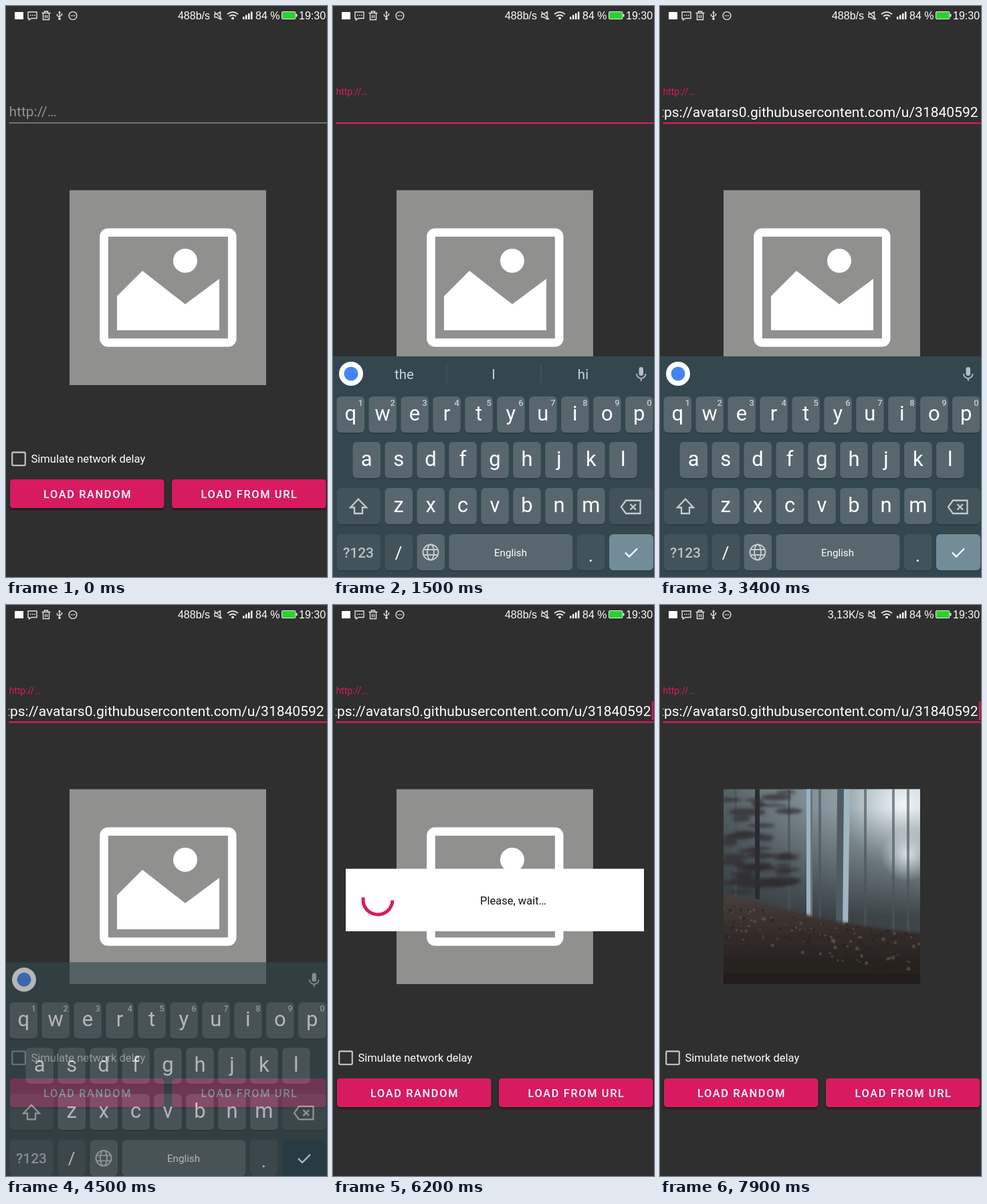
Write an HTML page that moves like this. It is 480 px wide and 854 px high and loops after 8 s.

```html
<!DOCTYPE html>
<html lang="en">
<head>
<meta charset="utf-8">
<title>Image loader</title>
<style>
  html, body { margin: 0; width: 100%; height: 100%; overflow: hidden; background: #2e2f2e; }
  svg { display: block; width: 100vw; height: 100vh; }
  text { font-family: Roboto, sans-serif; fill: #fff; white-space: pre; }
  .status text { font: 16px "Liberation Sans", Arial, sans-serif; }
  .line { fill: none; stroke: #e4e4e4; stroke-width: 1.4; }
  .btn { font-size: 16.35px; font-weight: 500; letter-spacing: 1.65px; text-anchor: middle; }
  .mid { text-anchor: middle; }
  .key { font-size: 31px; text-anchor: middle; }
  .digit { font-size: 13px; font-weight: 500; text-anchor: middle; fill: #c4cdd1; }
  .icon { fill: none; stroke: #c3ccd0; stroke-width: 2.3; }
  .word { font-size: 20.5px; text-anchor: middle; fill: #cbd3d6; }
</style>
</head>
<body>
<svg viewBox="0 0 480 854" preserveAspectRatio="none">
  <defs>
    <clipPath id="field"><rect x="4" y="140" width="476" height="40"/></clipPath>
    <clipPath id="photoBox"><rect x="95" y="275.5" width="294" height="291.5"/></clipPath>
    <clipPath id="leftBtn"><rect x="6" y="708" width="230.5" height="43" rx="4.5"/></clipPath>
    <clipPath id="rightBtn"><rect x="248" y="708" width="230.5" height="43" rx="4.5"/></clipPath>
    <linearGradient id="mist" x1="0" y1="0.3" x2="1" y2="0">
      <stop offset="0" stop-color="#4b5559"/><stop offset="0.45" stop-color="#7f8e94"/><stop offset="1" stop-color="#b4c3cb"/>
    </linearGradient>
    <linearGradient id="haze" x1="0" y1="0" x2="0" y2="1">
      <stop offset="0.1" stop-color="#3a4448" stop-opacity="0"/><stop offset="0.65" stop-color="#333a3d" stop-opacity="0.9"/>
    </linearGradient>
    <linearGradient id="soil" x1="0" y1="0" x2="0" y2="1">
      <stop offset="0" stop-color="#4a403d"/><stop offset="0.45" stop-color="#332b28"/><stop offset="1" stop-color="#1d1a18"/>
    </linearGradient>
    <radialGradient id="sun"><stop offset="0" stop-color="#f1f6f8"/><stop offset="1" stop-color="#dfe9ee" stop-opacity="0"/></radialGradient>
    <filter id="soft"><feGaussianBlur stdDeviation="2"/></filter>
    <filter id="shade" x="-5%" y="-20%" width="110%" height="150%"><feGaussianBlur stdDeviation="1.5"/></filter>
  </defs>
  <rect width="480" height="854" fill="#2e2f2e"/>

  <g class="status">
    <rect x="13" y="9" width="13" height="11" fill="#fff"/>
    <path class="line" d="M33 9H46V18.5H38L34.5 21V18.5H33Z M36 13.8h1.6m1.4 0h1.6m1.4 0h1.6"/>
    <path class="line" d="M53.5 10.5H66.5M57.5 10.5V8H62.5V10.5M55.5 11V20.5H64.5V11M58.6 13.5v4.5M61.4 13.5v4.5"/>
    <path class="line" d="M80 9V19M76.5 12V14.5L80 17M83.5 11V13.5L80 16"/>
    <path d="M78 10.5L80 7L82 10.5Z" fill="#e4e4e4"/>
    <circle cx="80" cy="19.3" r="1.8" fill="#e4e4e4"/>
    <circle class="line" cx="100" cy="14.5" r="5.9"/>
    <path class="line" d="M96.7 14.5h1.6m.9 0h1.6m.9 0h1.6"/>
    <text id="speed" x="305" y="20" text-anchor="end"></text>
    <path class="line" d="M312 12H315L320.5 8.8V19.8L315 16.8H312ZM311.5 8.5L323 20"/>
    <path class="line" style="stroke-width:2" d="M331 12.3Q339 5.8 347 12.3M334 15.5Q339 11.5 344 15.5"/>
    <circle cx="339" cy="18.3" r="1.9" fill="#fff"/>
    <path d="M354 20v-4h2.5v4zM358 20v-6.500h2.500v6.500zM362 20v-9h2.500v9zM366 20V8.500h2.500V20z" fill="#fff"/>
    <text x="373" y="20">84 %</text>
    <rect x="412.500" y="8.500" width="20.500" height="11" rx="1.500" fill="#2bd12f" stroke="#e8e8e8"/>
    <rect x="433.500" y="12" width="2" height="4" fill="#e8e8e8"/>
    <text x="438" y="20">19:30</text>
  </g>

  <text id="label" x="4.500">http://…</text>
  <text id="url" x="475.500" y="166" font-size="21" text-anchor="end" clip-path="url(#field)">https://avatars0.githubusercontent.com/u/31840592</text>
  <rect id="rule" x="4.500" width="476"/>
  <rect id="caret" y="144" width="2.500" height="28" fill="#d81b60"/>

  <g id="placeholder">
    <rect x="95" y="275.500" width="294" height="291.500" fill="#90918f"/>
    <rect x="146.500" y="338.700" width="191.700" height="164.800" rx="6" fill="none" stroke="#fff" stroke-width="12.600"/>
    <circle cx="268" cy="381" r="18" fill="#fff"/>
    <path d="M166 434L204 396L268 446L319 408V485H166Z" fill="#fff"/>
  </g>
  <g id="avatar"></g>
  <g id="photo" clip-path="url(#photoBox)"></g>

  <rect x="9.200" y="667.500" width="19.600" height="19.600" rx="1.500" fill="none" stroke="#bfbfbf" stroke-width="2.300"/>
  <text x="37.500" y="683" font-size="16.550">Simulate network delay</text>
  <g id="buttons"></g>

  <g id="dialog">
    <rect x="19" y="394.500" width="446" height="93.500" fill="#fff"/>
    <path id="spin" fill="none" stroke="#d81b60" stroke-width="5"/>
    <text x="220" y="447.500" font-size="16.550" style="fill:#111">Please, wait…</text>
  </g>
  <g id="keyboard"></g>
</svg>
<script>
const LOOP = 8000, STEP = 100;
const AT = {
  focus: 600, keysIn: 1000, paste: 2800, done: 4300, keysOut: 4400,
  tapUrl: 5700, wait1: 5800, avatar: 6300, speed: 6500,
  tapRandom: 7000, wait2: 7100, photo: 7500
};
const $ = id => document.getElementById(id);
const set = (id, attrs) => { for (const k in attrs) $(id).setAttribute(k, attrs[k]); };
const show = (id, on) => { $(id).style.display = on ? '' : 'none'; };
const clamp = v => Math.min(1, Math.max(0, v));
const ease = v => v * v * (3 - 2 * v);
const mix = (a, b, p) => a + (b - a) * p;
const rect = (x, y, w, h, fill, extra = '') =>
  `<rect x="${x}" y="${y}" width="${w}" height="${h}" fill="${fill}" ${extra}/>`;
const text = (x, y, cls, s, extra = '') => `<text x="${x}" y="${y}" class="${cls}" ${extra}>${s}</text>`;

function buildButtons() {
  const button = (x, name, label, touch) =>
    rect(x, 710, 230.5, 43, '#000', 'rx="4.5" opacity="0.5" filter="url(#shade)"') +
    rect(x, 708, 230.5, 43, '#d81b60', 'rx="4.5"') +
    `<g clip-path="url(#${name}Btn)"><circle id="${name}Wave" cx="${touch}" cy="730" fill="#fff"/></g>` +
    text(x + 116, 736, 'btn', label);
  $('buttons').innerHTML = button(6, 'left', 'LOAD RANDOM', 167) + button(248, 'right', 'LOAD FROM URL', 363);
}

function buildAvatar() {
  const rows = ['.#.#.', '.###.', '.###.', '#...#', '#####'];
  let out = rect(95, 275.5, 294, 291.5, '#eceeec');
  rows.forEach((row, j) => [...row].forEach((c, i) => {
    if (c === '#') out += rect(119.5 + i * 49.1, 299.5 + j * 48.7, 49.3, 48.9, '#5b85c0');
  }));
  $('avatar').innerHTML = out;
}

function buildPhoto() {
  let seed = 7;
  const rnd = () => (seed = (seed * 16807) % 2147483647) / 2147483647;
  let out = rect(95, 275, 294, 292, 'url(#mist)') +
    '<circle cx="364" cy="298" r="95" fill="url(#sun)"/>' + rect(95, 275, 294, 292, 'url(#haze)') +
    '<circle cx="370" cy="373" r="40" fill="url(#sun)" opacity="0.8"/>';
  for (const [x, w] of [[111, 4], [191, 4], [237, 4], [305, 4], [347, 4], [369, 4]])
    out += rect(x, 275, w, 215, '#49555b', 'opacity="0.65"');
  out += rect(142, 275, 7, 165, '#2a2c2e');
  let boughs = '';
  for (let i = 0; i < 46; i++) {
    const y = 280 + rnd() * 150, x = 148 + (rnd() - 0.5) * 95;
    boughs += `<ellipse cx="${x}" cy="${y}" rx="${10 + rnd() * 18}" ry="${2 + rnd() * 4}" fill="#2f2c30" opacity="0.7"/>`;
  }
  out += `<g filter="url(#soft)">${boughs}</g>`;
  out += rect(219, 275, 9, 195, '#9cb3c1') + rect(225, 275, 3, 195, '#65757f') +
    '<path d="M265 275H283L281 490H263Z" fill="#4f5b62"/><path d="M275 275H284L281 490H273Z" fill="#a0b6c4"/>';
  out += '<path d="M85 428Q150 445 215 462T400 492V580H85Z" fill="url(#soil)" filter="url(#soft)"/>';
  for (let i = 0; i < 170; i++) {
    const x = 95 + rnd() * 294, y = 445 + (x - 95) * 0.17 + rnd() * 60;
    out += `<circle cx="${x}" cy="${y}" r="${1 + rnd() * 2}" fill="${rnd() < 0.5 ? '#655651' : '#292321'}" opacity="0.6"/>`;
  }
  $('photo').innerHTML = out;
}

function buildKeyboard() {
  const LIGHT = '#57676d', DARK = '#42545a';
  const key = (x, y, w, fill, extra = '') =>
    rect(x, y + 1.6, w, 54, '#293a41', 'rx="6"') + rect(x, y, w, 54, fill, 'rx="6" ' + extra);
  let out = rect(0, 524, 480, 350, '#34474e');
  out += '<circle cx="27" cy="550" r="18" fill="#fff"/><circle cx="27" cy="550" r="10.5" fill="#4285f4"/>';
  out += '<g id="words">' + text(106.5, 558, 'word', 'the') + text(240, 558, 'word', 'I') + text(374, 558, 'word', 'hi') +
    rect(169.5, 536, 1, 28, '#4c5e65') + rect(310.5, 536, 1, 28, '#4c5e65') + '</g>';
  out += rect(457.5, 540, 6.5, 13, '#b4bfc4', 'rx="3.2"') +
    '<path class="icon" style="stroke-width:1.8;stroke:#b4bfc4" d="M454 550a6.800 6.800 0 0 0 13.600 0M460.800 557V561"/>';
  const rows = [['qwertyuiop', 5.5, 584, 35.5], ['asdfghjkl', 29.5, 652, 35.5], ['zxcvbnm', 77.5, 721, 36]];
  rows.forEach(([letters, x0, y, base], row) => [...letters].forEach((c, i) => {
    const x = x0 + i * 47.95;
    out += key(x, y, 41.5, LIGHT) + text(x + 20.7, y + base, 'key', c);
    if (!row) out += text(x + 35.8, y + 13.5, 'digit', (i + 1) % 10);
  }));
  out += key(5.5, 721, 65.5, DARK) + '<path class="icon" d="M38 737.500L50 750H44V759H32V750H26Z"/>';
  out += key(413, 721, 66, DARK) + '<path class="icon" d="M438 739.500H459.500V759H438L431 749.300ZM444.500 745l8.500 8.500m0-8.500l-8.500 8.500"/>';
  out += key(5.5, 790, 65.5, DARK) + text(38, 825, 'mid', '?123', 'font-size="21" font-weight="500" style="fill:#b9c3c7"');
  out += key(77.5, 790, 41.5, DARK) + text(98, 827, 'mid', '/', 'font-size="26"');
  out += key(125.5, 790, 41.5, LIGHT) +
    '<g class="icon" style="stroke-width:1.9"><circle cx="146" cy="817" r="11.500"/><ellipse cx="146" cy="817" rx="5" ry="11.500"/><path d="M135.500 813H156.500M135.500 821H156.500"/></g>';
  out += key(173.4, 790, 185, LIGHT) + text(265.5, 823, 'mid', 'English', 'font-size="15.2"');
  out += key(365, 790, 41.5, DARK) + text(385.5, 831, 'mid', '.', 'font-size="28"');
  out += key(413, 790, 66, '#728d98', 'id="enter"') + '<path class="icon" style="stroke:#fff" d="M437 817.500L443 823.500L455 811.500"/>';
  $('keyboard').innerHTML = out;
}

function drawField(t) {
  const p = ease(clamp((t - AT.focus) / 200)), focused = t >= AT.focus;
  const [r, g, b] = [[146, 216], [146, 27], [146, 96]].map(([from, to]) => Math.round(mix(from, to, p)));
  $('label').style.fill = `rgb(${r},${g},${b})`;
  set('label', { y: mix(165, 133, p), 'font-size': mix(21, 14, p) });
  set('rule', { y: focused ? 174 : 174.2, height: focused ? 2.3 : 1.2, fill: focused ? '#d81b60' : '#a0a0a0' });
  show('url', t >= AT.paste);
  const phase = t % 1000;
  set('caret', { x: t >= AT.paste ? 476.8 : 5 });
  show('caret', t >= AT.focus + 200 && (phase < 300 || phase >= 800));
}

function drawKeyboard(t) {
  const enter = clamp((t - AT.keysIn + 100) / 300), leave = clamp((t - AT.keysOut) / 300);
  const dy = (1 - enter) * 30 + leave * 31;
  set('keyboard', { transform: `translate(0 ${dy})`, opacity: enter * (1 - leave * 1.05) });
  show('keyboard', t >= AT.keysIn && leave < 1);
  show('words', t < AT.paste);
  set('enter', { fill: t < AT.done ? '#728d98' : '#24434d' });
}

function drawWave(id, age) {
  show(id, age >= 0 && age < 500);
  set(id, { r: 20 + Math.max(0, age) * 0.235, opacity: 0.3 * (1 - clamp((age - 150) / 350)) });
}

function drawSpinner(age) {
  const point = deg => {
    const a = (deg - 90) * Math.PI / 180;
    return `${67 + 22 * Math.cos(a)} ${441 + 22 * Math.sin(a)}`;
  };
  const from = age * 0.23, sweep = 16 + 265 * ease(clamp(age / 667));
  set('spin', { d: `M${point(from)}A22 22 0 ${sweep > 180 ? 1 : 0} 1 ${point(from + sweep)}` });
}

function draw(t) {
  drawField(t);
  drawKeyboard(t);
  $('speed').textContent = t < AT.speed ? '488b/s' : '3,13K/s';
  show('placeholder', t < AT.avatar);
  show('avatar', t >= AT.avatar && t < AT.photo);
  show('photo', t >= AT.photo);
  drawWave('rightWave', t - AT.tapUrl);
  drawWave('leftWave', t - AT.tapRandom);
  const second = t >= AT.wait2;
  show('dialog', second ? t < AT.photo : t >= AT.wait1 && t < AT.avatar);
  drawSpinner(Math.max(0, t - (second ? AT.wait2 : AT.wait1)));
}

buildButtons();
buildAvatar();
buildPhoto();
buildKeyboard();
const start = performance.now();
function tick() {
  const t = (performance.now() - start) % LOOP;
  draw(Math.floor(t / STEP) * STEP);
  requestAnimationFrame(tick);
}
tick();
</script>
</body>
</html>
```
